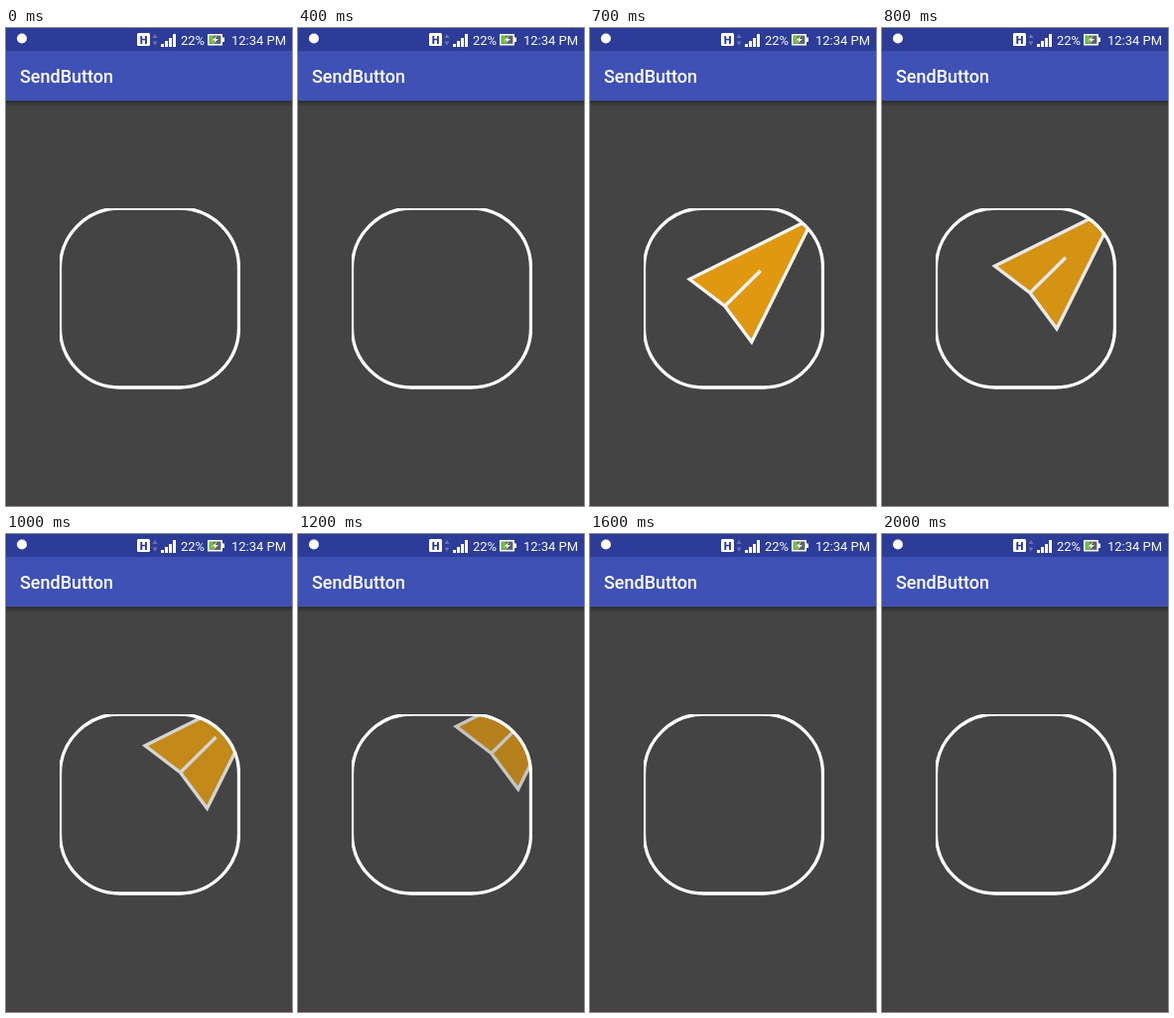
Write an HTML page that moves like this. It is 288 px wide and 480 px high and loops after 2.1 s.

```html
<!DOCTYPE html>
<html lang="en">
<head>
<meta charset="utf-8">
<title>Send button</title>
<style>
  html, body { margin: 0; width: 100%; height: 100%; overflow: hidden; background: #444; }
  svg { display: block; width: 288px; height: 480px; }
  text { fill: #fff; font: 13px Roboto, sans-serif; }
  .title { font-size: 18px; font-weight: 500; }
  .badge { font-size: 11px; font-weight: 900; fill: #2c3b95; text-anchor: middle; }
</style>
</head>
<body>
<svg viewBox="0 0 288 480">
  <defs>
    <linearGradient id="shadow" x2="0" y2="1">
      <stop stop-color="#000" stop-opacity=".32"/>
      <stop offset="1" stop-color="#000" stop-opacity="0"/>
    </linearGradient>
    <clipPath id="inside"><rect x="54.5" y="181" width="180" height="180" rx="60"/></clipPath>
    <clipPath id="view"><rect x="54" y="181" width="182" height="182"/></clipPath>
  </defs>

  <rect width="288" height="480" fill="#444"/>
  <rect y="73" width="288" height="6" fill="url(#shadow)"/>
  <rect y="477" width="288" height="3" fill="#4a4043"/>
  <rect width="288" height="73" fill="#3f51b5"/>
  <rect width="288" height="23" fill="#2c3c98"/>

  <!-- status bar -->
  <circle cx="16" cy="10.5" r="5" fill="#fff"/>
  <rect x="132" y="5" width="13" height="13" rx="1.5" fill="#fff"/>
  <text class="badge" x="138.5" y="15.5">H</text>
  <path d="M147.5 10l2.5-4 2.5 4zM147.5 13.5l2.5 4 2.5-4z" fill="#6873b3"/>
  <path d="M156 19v-3h3v3zM160 19v-6h3v6zM164 19v-9h3v9zM168 19v-13h3v13z" fill="#fff"/>
  <text x="176" y="16.5">22%</text>
  <rect x="203.8" y="6.8" width="13.4" height="9.9" fill="#59636b" stroke="#fff" stroke-width="1.6"/>
  <rect x="218" y="9.5" width="2" height="4.5" fill="#fff"/>
  <rect x="205" y="8" width="4" height="7.5" fill="#6cc52c"/>
  <path d="M212.5 7.5l-5 5h3l-2 3.5 5.5-5h-3.2z" fill="#fff"/>
  <text x="227" y="16.5">12:34 PM</text>
  <text class="title" x="14" y="55">SendButton</text>

  <!-- button -->
  <g clip-path="url(#inside)">
    <g id="plane" fill="#e99e0e" stroke="#fff" stroke-width="3.3">
      <path d="M212 203.5L87 265.5 122.5 292.5 149.5 328.5z"/>
      <path d="M122.5 292.5L158.5 257"/>
    </g>
  </g>
  <rect x="54.5" y="181" width="180" height="180" rx="60" fill="none" stroke="#fff"
        stroke-width="3.3" clip-path="url(#view)"/>
</svg>
<script>
  const LOOP = 2100, STEP = 100, START = 600, SLOW = 1000, END = 1500;
  const plane = document.getElementById('plane');

  // Distance flown along each axis: fast at first, then slower.
  const distance = t => 0.1325 * (Math.min(t, SLOW) - START) + 0.096 * Math.max(0, t - SLOW);

  function draw(now) {
    const t = Math.floor(now % LOOP / STEP) * STEP;
    const flying = t >= START && t < END;
    const d = distance(t);
    plane.setAttribute('visibility', flying ? 'visible' : 'hidden');
    if (flying) {
      plane.setAttribute('transform', `translate(${d} ${-d})`);
      plane.setAttribute('opacity', 1 - d / 235);
    }
  }

  let origin;
  function tick(now) {
    origin ??= now;
    draw(now - origin);
    requestAnimationFrame(tick);
  }
  draw(0);
  requestAnimationFrame(tick);
</script>
</body>
</html>
```
